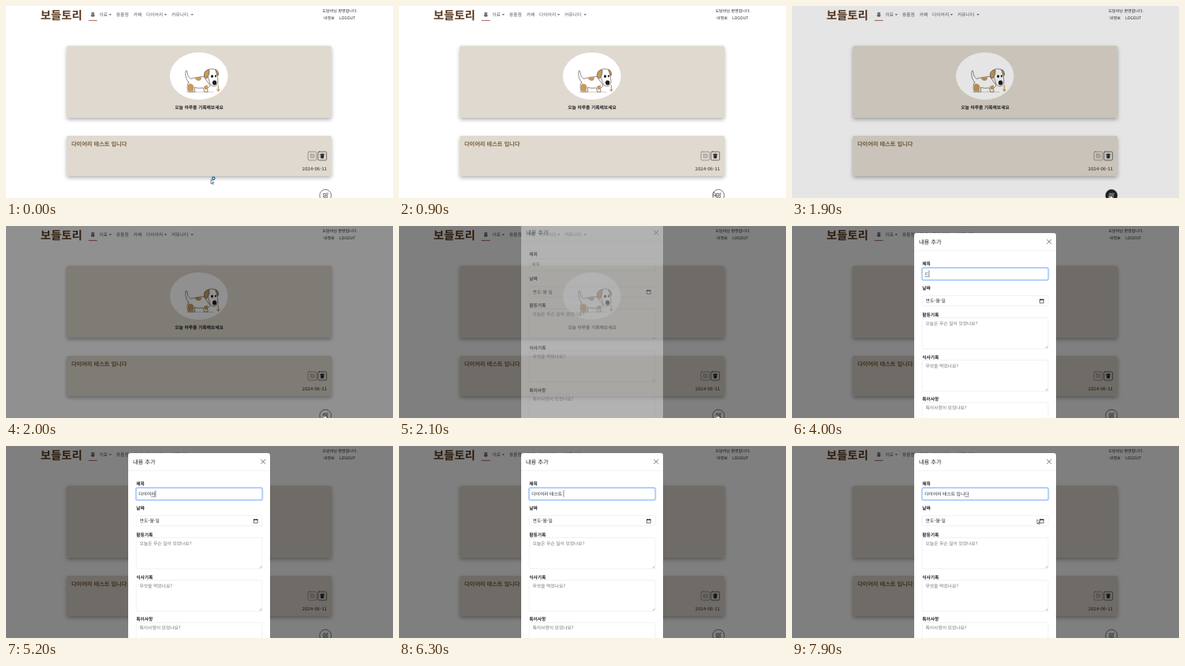
Recreate the animation shown at these times as an HTML page. Size 491 px wide and 244 px high, loop 8 s.

```html
<!DOCTYPE html>
<html lang="ko">
<head>
<meta charset="utf-8">
<title>다이어리</title>
<style>
  html, body { margin: 0; width: 100%; height: 100%; overflow: hidden; background: #fff; }
  svg { display: block; width: 491px; height: 244px; }
  text {
    font-family: "Noto Sans CJK KR", "Noto Sans CJK", "Noto Sans", sans-serif;
    white-space: pre;
    text-rendering: geometricPrecision;
  }
  .line { fill: none; stroke: #212529; stroke-width: .6; stroke-linecap: round; stroke-linejoin: round; }
</style>
</head>
<body>
<svg id="stage" viewBox="0 0 491 244">
  <defs>
    <filter id="shadow" x="-10%" y="-20%" width="120%" height="150%">
      <feDropShadow dx="0" dy="2.4" stdDeviation="2.6" flood-color="#000" flood-opacity=".3"/>
    </filter>
  </defs>

  <g id="page">
    <rect width="491" height="244" fill="#fff"/>
    <path d="M104.7 18.4H115.6" stroke="#a5524c" stroke-width=".9"/>
    <g fill="#5c5c5c">
      <path d="M130.5 10.2h3.5l-1.75 1.8z"/>
      <path d="M200.7 10.2h3.5l-1.75 1.8z"/>
      <path d="M234.3 10.2h3.5l-1.75 1.8z"/>
    </g>
    <g fill="#e0d9cf" filter="url(#shadow)">
      <rect x="77" y="50.5" width="336" height="91.5" rx="2"/>
      <rect x="77" y="165" width="336" height="51" rx="2"/>
    </g>
    <ellipse cx="244.7" cy="89" rx="36.8" ry="30" fill="#fff"/>

    <g id="dog" stroke="#4b4038" stroke-width=".6" stroke-linejoin="round" stroke-linecap="round">
      <path d="M229 109.3H263" stroke="#c9c4bd" stroke-width=".8"/>
      <path d="M231.5 97C228 92 227 87 228.2 82.5Q230 81.5 230 85Q230.5 90 234 92.5Q243 90 251 89.5L259 101Q257 104 255.5 104L256 109H251.5L250.5 104Q244 105 239.5 103.5L239.5 109H231.5Q228.5 103 231.5 97Z" fill="#fff"/>
      <path d="M232 99Q237 98 238.5 103L237.5 108.5H231.8Q229.6 103 232 99Z" fill="#c79a5d" stroke="none"/>
      <path d="M240 91.3Q246 89.6 248 90.5Q248 95 244 95Q240 94.5 240 91.3Z" fill="#c79a5d" stroke="none"/>
      <path d="M251 102L256 100.5L255.5 106H252Z" fill="#c79a5d" stroke="none"/>
      <path d="M254 83Q256 79.5 262 80Q267 80 267.5 85L269 96Q268.5 102 263.5 102Q258.5 101.5 258 96Z" fill="#fff"/>
      <path d="M255.5 81.5Q250.5 83 251.5 89.5Q253 94 256 90.5Q258.5 86 258 82Z" fill="#c79a5d"/>
      <path d="M266 80.8Q270 82 269.5 88Q268 90 267.3 86Z" fill="#c79a5d"/>
      <g fill="#211d1b" stroke="none">
        <ellipse cx="261.5" cy="89.3" rx="1.5" ry="1.9"/>
        <ellipse cx="265.8" cy="89" rx="1" ry="1.5"/>
        <ellipse cx="264.6" cy="97.4" rx="2.7" ry="3"/>
      </g>
      <path d="M269.3 101V107.5M267.7 106L269.3 108.4L270.9 106" fill="none" stroke="#b9873f" stroke-width="1"/>
    </g>

    <g class="line">
      <rect x="383.2" y="185.2" width="10.8" height="10.8" rx="1.4" stroke="#6c6862"/>
      <rect x="386.2" y="188.2" width="5" height="4.6" rx=".6" stroke="#6c6862" stroke-width=".5"/>
      <path d="M387.4 189.7h.2M388.6 189.7h1.6M387.4 191.3h.2M388.6 191.3h1.6" stroke="#6c6862" stroke-width=".5"/>
      <rect x="395.9" y="185.2" width="10.8" height="10.8" rx="1.4"/>
      <path d="M398.8 188.5h5M400.4 188h1.8" stroke-width=".9"/>
      <path d="M399.4 189.6h3.8l-.4 3.7h-3z" fill="#212529"/>
    </g>
    <circle id="add" cx="405.3" cy="240.7" r="7.4" stroke="#212529" stroke-width=".6"/>
    <g id="pen" class="line">
      <path d="M405.3 238.3h-2.5v4.9h4.9v-2.4" stroke-width=".65"/>
      <path d="M404.6 241.5l.3-1.2 2.8-2.8.9.9-2.8 2.8z" stroke-width=".65"/>
    </g>
  </g>

  <rect id="dim" width="491" height="244" fill="#000"/>

  <g id="modal">
    <rect x="155" y="9" width="180" height="270" rx="2.9" fill="#fff"/>
    <path d="M155 31.2H335" stroke="#dee2e6" stroke-width=".5"/>
    <path d="M323.7 17.3l5.2 5.2m0-5.2l-5.2 5.2" stroke="#666" stroke-width=".9" stroke-linecap="round"/>
    <g id="fields" fill="#fff" stroke="#dee2e6" stroke-width=".5"></g>
    <rect id="ring" x="164.6" y="52.7" width="161" height="16.3" rx="2.6" fill="none" stroke="#0d6efd" stroke-opacity=".27" stroke-width="1.5"/>
    <rect id="focus" x="165.2" y="53.4" width="159.8" height="15" rx="2.1" fill="none" stroke="#86b7fe" stroke-width=".6"/>
    <path d="M314.4 93.4h4.8v4.5h-4.8z" fill="none" stroke="#111" stroke-width=".6"/>
    <path d="M314.2 93.8h5.2M315.4 92.7v.6M318.2 92.7v.6" stroke="#111" stroke-width="1"/>
    <path id="under" stroke="#222" stroke-width=".45"/>
    <path id="caret" stroke="#111" stroke-width=".5"/>
  </g>

  <g id="pointer">
    <path id="arrow" d="M0 0V5.4L1.3 4.3L2.2 6.2L3 5.8L2.1 4H3.8Z" fill="#fff" stroke="#111" stroke-width=".5"/>
    <path id="hand" d="M-.6 .2Q0-.6 .6 .2V2.3L3 3V5.2L2.3 6.8H-.7L-2.3 4.2Q-2-3.4-.6 4Z" fill="#fff" stroke="#111" stroke-width=".5"/>
    <circle id="busy" cx="3.3" cy="-1.4" r="1.7" fill="#bfe3f5" stroke="#176a9c" stroke-width="1.2"/>
  </g>
</svg>

<script>
const $ = id => document.getElementById(id);
const NS = 'http://www.w3.org/2000/svg';
const ZOOM = 0.36;   // page pixels to stage pixels
const LOOP = 8000;

function make(parent, tag, attrs) {
  const el = document.createElementNS(NS, tag);
  for (const k in attrs) el.setAttribute(k, attrs[k]);
  return parent.appendChild(el);
}

function label(parent, x, y, str, size = 16, fill = '#212529', weight = 400, anchor = 'start') {
  const el = make(parent, 'text', {
    transform: `translate(${x} ${y}) scale(${ZOOM})`,
    'font-size': size, fill, 'font-weight': weight, 'text-anchor': anchor
  });
  el.textContent = str;
  return el;
}

const page = $('page'), modal = $('modal');
const NAV = '#5c5c5c', HINT = '#6c7075';

label(page, 43.8, 16.6, '보들토리', 40, '#5b3a1f', 700);
label(page, 107.4, 13.2, '홈', 16, '#2b2b2b', 700);
[[118.3, '의료'], [139.8, '용품점'], [161.8, '카페'], [178, '다이어리'], [210, '커뮤니티']]
  .forEach(([x, s]) => label(page, x, 13.2, s, 16, NAV));
label(page, 446, 7.7, '도담비님 환영합니다.', 14, '#212529', 400, 'end');
label(page, 403, 17, '내정보', 14);
label(page, 423, 17, 'LOGOUT', 14);
label(page, 245, 131.1, '오늘 하루를 기록해보세요', 16, '#212529', 700, 'middle');
label(page, 83, 178.1, '다이어리 테스트 입니다', 20, '#77603f', 700);
label(page, 407.2, 208.5, '2024-06-11', 16, '#6c6255', 700, 'end');

label(modal, 161, 22.9, '내용 추가', 20, '#212529', 500);
[[50, '제목'], [80.8, '날짜'], [114.5, '활동기록'], [168.5, '식사기록'], [222.3, '특이사항']]
  .forEach(([y, s]) => label(modal, 165.2, y, s, 16, '#212529', 700));
[[53.4, 15], [88.6, 13], [116.6, 39.4], [170.6, 39.4], [224.6, 39.4]]
  .forEach(([y, height]) => make($('fields'), 'rect', { x: 165.2, y, width: 159.8, height, rx: 1.5 }));
[155.2, 209.2].forEach(y => make($('fields'), 'path', {
  d: `M321.8 ${y}l2.5-2.5M323.2 ${y}l1.1-1.1`, stroke: '#777', fill: 'none'
}));
label(modal, 169.6, 97.4, '연도-월-일');
[[125.5, '오늘은 무슨 일이 있었나요?'], [179.5, '무엇을 먹었나요?'], [233.4, '특이사항이 있었나요?']]
  .forEach(([y, s]) => label(modal, 169.5, y, s, 16, HINT));
const hint = label(modal, 168.3, 63, '제목', 16, HINT);
const typed = label(modal, 168.3, 63, '');

// Each step: time, length of the finished text kept, syllable being composed
const FULL = '다이어리 테스트 입니다';
const STEPS = [
  [3300, 0, ''], [4000, 0, 'ㄷ'], [4500, 0, '다'], [4700, 1, 'ㅇ'], [4800, 1, '이'],
  [4900, 2, 'ㅇ'], [5000, 2, '어'], [5200, 3, '리'], [5300, 4, ' '], [5500, 5, '테'],
  [5700, 6, 'ㅅ'], [5800, 6, '스'], [6100, 7, 'ㅌ'], [6200, 7, '트'], [6300, 8, ' '],
  [6500, 9, 'ㅇ'], [6600, 9, '이'], [6700, 9, '입'], [6900, 10, '니'], [7100, 11, '다']
];

// Pointer path: time, x, y
const ROAM = [[0, 260, 220.5], [300, 292, 217], [600, 352, 226], [900, 399, 236], [1200, 405, 240], [1900, 404, 239.5], [2400, 404, 239.5], [2700, 331, 182], [2900, 273, 88]];
const BACK = [[7700, 302, 91], [7900, 311, 93.5]];

const clamp = v => Math.max(0, Math.min(1, v));

function along(path, t) {
  let i = 1;
  while (i < path.length - 1 && t > path[i][0]) i++;
  const a = path[i - 1], b = path[i], k = clamp((t - a[0]) / (b[0] - a[0]));
  return [a[1] + (b[1] - a[1]) * k, a[2] + (b[2] - a[2]) * k];
}

const show = (el, on) => el.setAttribute('visibility', on ? 'inherit' : 'hidden');

function drawPointer(t) {
  const seen = t < 3000 || t >= 7700;
  const [x, y] = along(t < 3000 ? ROAM : BACK, t);
  const over = t >= 1000 && t < 2500;
  $('pointer').setAttribute('transform', `translate(${x} ${y})`);
  show($('pointer'), seen);
  show($('arrow'), !over);
  show($('hand'), over);
  show($('busy'), t < 300);
}

function drawInput(t) {
  const step = STEPS.filter(s => s[0] <= t).pop();
  const [start, kept, last] = step || [0, 0, ''];
  const left = 168.3;
  const width = s => { typed.textContent = s; return s ? typed.getComputedTextLength() * ZOOM : 0; };
  const from = left + width(FULL.slice(0, kept));
  const to = left + width(FULL.slice(0, kept) + last);
  show(hint, !last);
  show($('under'), last.trim());
  $('under').setAttribute('d', `M${from} 64.4H${to}`);
  $('caret').setAttribute('d', `M${to + .3} 56.3V64.8`);
  show($('caret'), step && Math.floor((t - start) / 500) % 2 === 0);
}

function draw(t) {
  const hover = t < 2000 ? clamp((t - 950) / 150) : 0;
  $('add').setAttribute('fill', `rgba(33,37,41,${hover})`);
  $('pen').querySelectorAll('path').forEach(p => p.style.stroke = hover > .5 ? '#fff' : '#212529');

  $('dim').setAttribute('opacity', .5 * clamp((t - 1870) / 150));

  const slide = clamp((t - 2040) / 300);
  modal.setAttribute('opacity', clamp((t - 2040) / 150));
  modal.setAttribute('transform', `translate(0 ${-18 * (1 - slide) ** 2})`);

  const focus = clamp((t - 3120) / 150);
  $('ring').setAttribute('opacity', focus);
  $('focus').setAttribute('opacity', focus);

  drawInput(t);
  drawPointer(t);
}

const begin = performance.now();
function tick() {
  const t = (performance.now() - begin) % LOOP;
  draw(Math.floor(t / 100) * 100);   // the screen refreshes ten times a second
  requestAnimationFrame(tick);
}
tick();
</script>
</body>
</html>
```
